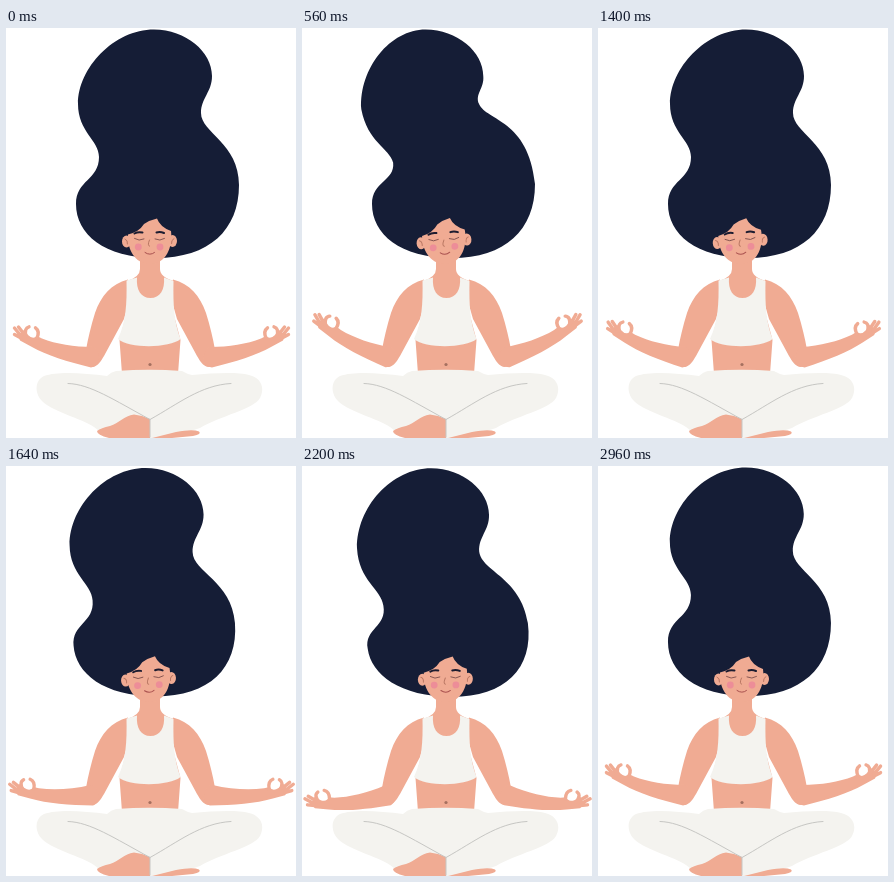
An HTML page for the animation above (3 s loop, 290 by 410 pixels).

```html
<!DOCTYPE html>
<html lang="en">
<head>
<meta charset="utf-8">
<title>Meditation</title>
<style>
  html, body { margin: 0; width: 100%; height: 100%; overflow: hidden; background: #fff; }
  svg { display: block; width: 290px; height: 410px; }
  .skin { fill: #f0ab93; }
  .cloth { fill: #f4f3ef; }
  .line { fill: none; stroke-linecap: round; stroke-linejoin: round; }
  .finger { stroke: #f0ab93; stroke-width: 3.4; }
  .fold { stroke: #c6c6c3; stroke-width: 1; }
  .brow { stroke: #1c1c30; stroke-width: 2; }
  .lash { stroke: #7d4e4c; stroke-width: .9; }
  .nose { stroke: #b97763; stroke-width: 1; }
  .lip { stroke: #a9514f; stroke-width: 1; }
  .cheek { fill: #ec8799; opacity: .85; }
</style>
</head>
<body>
<svg viewBox="0 0 290 410">
  <defs>
    <path id="upperArm" class="skin" d="M122 251.500C105 256 95 268 89 285C85 298 82 310 80 322C77 332 80 339 87 339C92 338 95 333 98 328L118 291L124 270Z"/>
    <g id="forearm">
      <path class="skin" d="M85 339.500C62 334 40 327 26 319L14 312.500L12 307L18 302L22 307Q27 312 31 308L36 310.500C50 316 68 319 87 319C95 322 96 338 85 339.500Z"/>
      <path class="line finger" d="M15 310L8.500 306.500M15 308L8.500 300M18 306L12.500 299M20 308Q18 300 23 298.800M31 310Q34 303 29.500 299.800"/>
    </g>
  </defs>

  <path id="hair" fill="#151d36"/>

  <use href="#upperArm"/>
  <use href="#upperArm" transform="translate(289 0) scale(-1 1)"/>
  <use class="arm" href="#forearm"/>
  <g transform="translate(291 0) scale(-1 1)"><use class="arm" href="#forearm"/></g>

  <path class="skin" d="M134 226V241Q134 249 121 253L122 280L113.500 312L116 346H172L174.500 312L166 280L168 253Q154 249 154 241V226Z"/>
  <path class="cloth" d="M120.500 252.500L131 249.500C130 262 135 270 144.500 270C154 270 159 262 158 249.500L167.500 253C167 278 168 294 174.500 311C164 320 124 321 112 311C120 294 121 276 120.500 252.500Z"/>
  <circle cx="144" cy="336.500" r="1.600" fill="#a5705f"/>

  <path class="cloth" d="M110 343Q144 340.500 176 343Q181 346 186 347C208 345 232 344 243 347C256 350 259 361 254 370C248 381 214 388 194 400Q172 408 145 410L92 402C80 391 48 385 36 373C29 366 28 353 38 348C52 343 78 345 101 348Q105 344 110 343Z"/>
  <path class="skin" d="M91 403Q95 400 104 398C113 395 118 388 128 386.500Q136 387 144 391V410H103Q91 407 91 403Z"/>
  <path class="skin" d="M146 410L170 404Q187 401 193 403.500Q196 406 187 408L166 410Z"/>
  <path class="line fold" d="M62 355.500C84 356 108 372 144 391.500C172 376 195 357 225 355.500M144 391.500V409"/>

  <g id="head">
    <ellipse class="skin" cx="120.500" cy="213.500" rx="4.500" ry="6"/>
    <ellipse class="skin" cx="166.500" cy="213" rx="4.500" ry="6"/>
    <path class="line nose" d="M119 211Q122 212 121.500 216M168 210.500Q165 212 165.500 215.500"/>
    <path class="skin" d="M122 206.500Q133 204 138 196Q144 192 151 190.500Q154 199 165 203C167 219 160 236 144.500 236C128 236 121 220 122 206.500Z"/>
    <path class="line brow" d="M128.500 205.500Q132 203.500 136.500 204.500M150.500 204.500Q154 203.300 158 205"/>
    <path class="line lash" d="M128.500 210.500Q133 213.500 138 211M149 211Q154 213.500 158.500 210.500"/>
    <path class="line nose" d="M143.500 212Q141 217.500 143.500 218.200"/>
    <path class="line lip" d="M139 224.500Q144 228 148.500 224.500"/>
    <circle class="cheek" cx="132.300" cy="219" r="3.400"/>
    <circle class="cheek" cx="154" cy="219" r="3.400"/>
  </g>
</svg>
<script>
const LOOP = 3000, STEP = 40;
const hair = document.getElementById("hair");
const head = document.getElementById("head");
const arms = document.querySelectorAll(".arm");

// Hair at rest: one curve per side of each lobe
const restHair = `M148,1.5 C180,1.5 206,24 206,48 C206,64 195,70 195,85
  C195,105 233,115 233,157 C233,202 203,230 150,230 C98,230 70,206 70,176
  C70,152 93,152 93,129 C93,112 72,104 72,76 C72,40 108,1.5 148,1.5Z`;

// Key moments: [ms, value]
const lean = [[0, 0], [600, 1], [1400, 0], [2000, 0], [2480, .44], [LOOP, 0]];
const drift = [[0, 0], [1400, 0], [1900, 1], [LOOP, 0]];
const lift = [[0, 0], [1050, 18], [1980, -26], [LOOP, 0]];
const tilt = [[0, 0], [400, -4], [1080, -4], [2480, 0], [LOOP, 0]];

const ease = u => (1 - Math.cos(Math.PI * u)) / 2;
const fade = u => ease(Math.min(1, Math.max(0, u)));

function at(keys, t) {
  const i = keys.findIndex(key => key[0] > t);
  const [t0, v0] = keys[i - 1], [t1, v1] = keys[i];
  return v0 + (v1 - v0) * ease((t - t0) / (t1 - t0));
}

// Lean swings the upper lobe about the waist; drift carries the whole mass
function sway(x, y, leaning, drifting) {
  const side = (x - 150) / 60;
  const waist = fade(1 - Math.abs(y - 105) / 60);
  const swing = 25 * fade((150 - y) / 100) * Math.min(1, 1 + .3 * side);
  const shift = 18 * fade((230 - y) / 150);
  const turn = -side * (13 + 4 * side) * waist;
  const sag = (6 - 5 * side) * fade(1 - Math.abs(y - 130) / 100);
  return [
    x - leaning * swing - drifting * shift,
    y + leaning * turn + drifting * (sag + 1)
  ].map(v => v.toFixed(2)).join();
}

function draw(t) {
  const leaning = at(lean, t), drifting = at(drift, t), angle = at(lift, t);
  hair.setAttribute("d", restHair.replace(/([\d.]+),([\d.]+)/g,
    (_, x, y) => sway(+x, +y, leaning, drifting)));
  const reach = 1 + .0025 * Math.max(0, angle);
  for (const arm of arms) arm.setAttribute("transform",
    `translate(86 330) rotate(${angle}) scale(${reach} 1) translate(-86 -330)`);
  head.setAttribute("transform", `rotate(${at(tilt, t)} 144 235)`);
}

const start = performance.now();
function tick() {
  const t = (performance.now() - start) % LOOP;
  draw(Math.floor(t / STEP) * STEP);
  requestAnimationFrame(tick);
}
tick();
</script>
</body>
</html>
```
